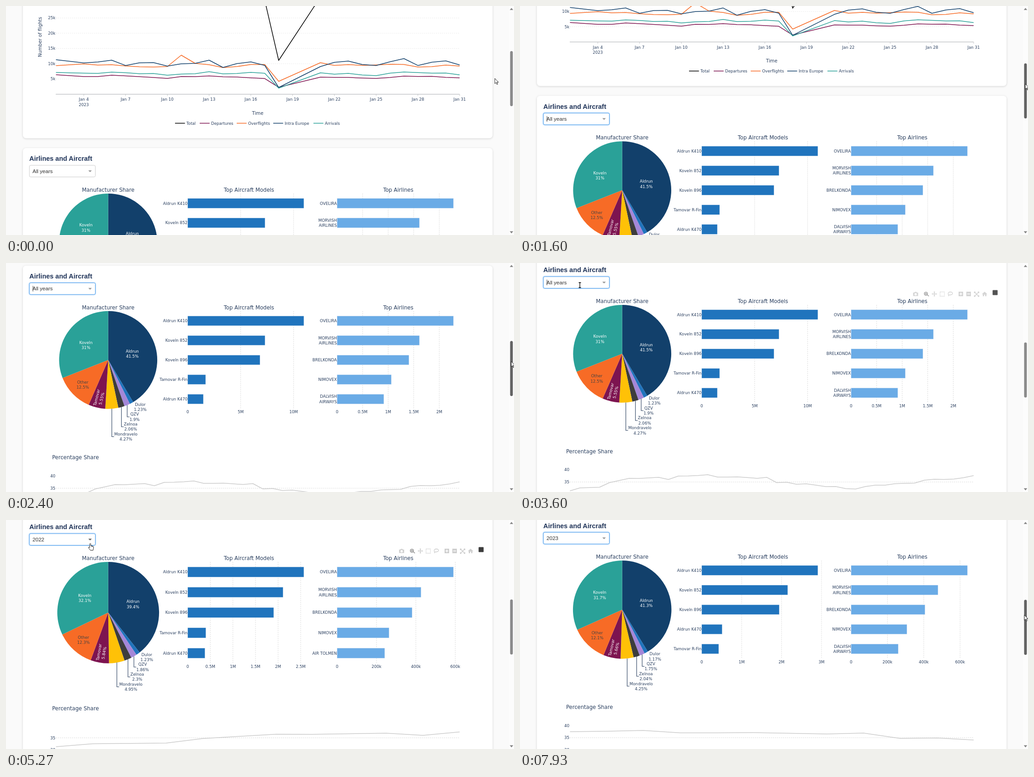
An HTML page for the animation above (8 s loop, 1112x503 px).

```html
<!DOCTYPE html>
<html lang="en">
<head>
<meta charset="utf-8">
<title>Flight dashboard</title>
<style>
html, body { margin: 0; width: 100%; height: 100%; overflow: hidden; background: #fafafa; }
svg { display: block; width: 1112px; height: 503px; isolation: isolate; }
text { font: 8.7px "DejaVu Sans", sans-serif; fill: #2a3f5f; white-space: pre; }
.title { font-size: 11.6px; }
.axis { font-size: 10.15px; }
.head { font: bold 14.48px "Liberation Sans", sans-serif; fill: #1f3358; }
.field { font: 11.58px "Liberation Sans", sans-serif; fill: #333; }
.light { fill: #fff; }
.dim { fill: #444; }
.card { fill: #fff; filter: drop-shadow(0 1px 2px rgba(0,0,0,.16)); }
.line { fill: none; stroke-width: 1.5; stroke-linejoin: round; }
.grid { fill: none; stroke: #ccc; stroke-width: .8; stroke-dasharray: 2.2 2.2; }
.lead { fill: none; stroke: #2a3f5f; stroke-width: 1.1; }
#cross { mix-blend-mode: difference; }
</style>
</head>
<body>
<svg id="stage" viewBox="0 0 1112 503" xmlns="http://www.w3.org/2000/svg"></svg>
<script>
const LEFT = 109.4, RIGHT = 993, NAVY = '#12406b';
const pen = document.createElement('canvas').getContext('2d');
pen.font = '8.7px "DejaVu Sans", sans-serif';
const widthOf = s => pen.measureText(s).width;

const text = (s, x, y, anchor = 'middle', cls = '', extra = '') =>
  `<text x="${x}" y="${y}" dy=".36em" text-anchor="${anchor}" class="${cls}" ${extra}>${s}</text>`;
const lines = (list, x, y, anchor, cls) =>
  list.map((s, i) => text(s, x, y + (i - (list.length - 1) / 2) * 11.3, anchor, cls)).join('');
const path = (d, attrs) => `<path d="${d}" ${attrs}/>`;
const rect = (x, y, w, h, attrs) => `<rect x="${x}" y="${y}" width="${w}" height="${h}" ${attrs}/>`;
const poly = (pts, color) =>
  `<polyline points="${pts.map(p => p.map(v => v.toFixed(1))).join(' ')}" class="line" stroke="${color}"/>`;

// Daily flights: pixel heights for days 2, 4-18 and 21-31
const days = [2];
for (let d = 4; d <= 31; d++) if (d < 19 || d > 20) days.push(d);
const dayX = d => LEFT + (d - 2) * 30.47;
const flights = [
  ['#7d1450', [151, 155, 155, 152, 153.5, 155.3, 157, 159, 155, 155.2, 153.5, 155.5, 156, 157.8, 159.3, 178.5,
    156.3, 156.8, 156.8, 158.2, 159, 157, 154, 154.8, 154.5, 156.7, 157.8]],
  ['#f76b26', [131, 127.3, 129.8, 129, 131.8, 133.5, 134, 133, 108, 126, 129, 135.3, 133, 128.5, 128.5, 165.5,
    124.5, 130.5, 128.7, 130.5, 129.5, 128, 128.5, 134, 133.3, 129.7, 132]],
  [NAVY, [118, 125, 123, 119, 130.7, 124.8, 124.3, 132, 127, 126, 119, 135, 126.5, 122.7, 130.5, 179,
    133, 123.7, 121, 128.5, 130.7, 122.5, 115.5, 130.7, 123.5, 120.5, 129.5]],
  ['#2aa198', [146, 147.5, 148, 145.3, 146.5, 148.7, 148.3, 152, 149.5, 148.7, 144.3, 149, 148.3, 145.8, 147.7, 180.5,
    146.8, 149.7, 148, 151.5, 153, 147.5, 145, 146.2, 147.5, 147.2, 151.3]]
];
const legend = [['Total', 370, '#000'], ['Departures', 424, '#7d1450'], ['Overflights', 505, '#f76b26'],
  ['Intra Europe', 585, NAVY], ['Arrivals', 673, '#2aa198']];

function flightChart() {
  let s = '';
  for (let k = 1; k <= 5; k++) {
    const y = 193.8 - k * 33.5;
    s += path(`M${LEFT} ${y}H${RIGHT}`, 'class="grid" style="stroke:#e4e4e4"') + text(k * 5 + 'k', 108, y, 'end');
  }
  s += path(`M${LEFT - .5} 193.8H${RIGHT}`, 'stroke="#c4c6c9" stroke-width="1.5"');
  for (let d = 4; d <= 31; d += 3) {
    s += path(`M${dayX(d)} 194v3.6`, 'stroke="#c4c6c9"') + text('Jan ' + d, dayX(d), 205.3);
  }
  s += text('2023', dayX(4), 216.8) + text('Time', 551, 235, 'middle', 'axis')
    + text('Number of flights', 0, 0, 'middle', 'axis', 'transform="translate(74.5 68) rotate(-90)"');
  s += poly([[dayX(17), -12.5], [dayX(18), 119.5], [dayX(21), -19.8]], '#000');
  for (const [color, ys] of flights) s += poly(ys.map((y, i) => [dayX(days[i]), y]), color);
  for (const [name, x, color] of legend)
    s += path(`M${x} 257.5h21.7`, `stroke="${color}" stroke-width="1.5"`) + text(name, x + 25, 257.5, 'start');
  return s;
}

// Pie slices run clockwise from the top
const makers = [['Aldrun', NAVY], ['Dulor', '#2074bd'], ['QZV', '#a487d8'], ['Zelnoa', '#3d3d3d'],
  ['Mondravelo', '#ffc107'], ['Tamovar', '#7d1450'], ['Other', '#f76b26'], ['Koveln', '#2aa198']];
const models = ['Aldrun K410', 'Koveln 852', 'Koveln 896', 'Tamovar R-Fin', 'Aldrun K470'];
const airlines = ['OVELIRA', 'MORVISH AIRLINES', 'BRELKONDA', 'NIMOVEX', 'DALVISH AIRWAYS'];
const views = [
  { mix: [41.5, 1.23, 1.9, 2.06, 4.27, 5.55, 12.5, 31], r: 107.4, labelY: 302.5,
    inside: { 0: [276.5, 185.6], 6: [168, 254], 7: [175, 166.8] },
    left: { names: models, ends: [652, 567, 556, 437, 432], step: 115.9, ticks: ['0', '5M', '10M'] },
    right: { names: airlines, ends: [979.5, 905, 882, 843.5, 827], step: 55.9, ticks: ['0', '0.5M', '1M', '1.5M', '2M'] } },
  { mix: [39.4, 1.23, 1.86, 2.3, 4.95, 5.84, 12.3, 32.1], r: 111.4, labelY: 301.2,
    inside: { 0: [278, 184.8], 6: [169.5, 263.5], 7: [172.5, 171.7] },
    left: { names: models, ends: [652, 606.5, 586, 437.5, 435.5], step: 49.45, ticks: ['0', '0.5M', '1M', '1.5M', '2M', '2.5M'] },
    right: { names: [...airlines.slice(0, 4), 'AIR TOLMEN'], ends: [979.5, 908.5, 889, 838.5, 829], step: 86.2, ticks: ['0', '200k', '400k', '600k'] } },
  { mix: [41.3, 1.17, 1.75, 2.04, 4.25, 5.66, 12.1, 31.7], r: 107.8, labelY: 302.6,
    inside: { 0: [276.5, 185.2], 6: [169, 256.2], 7: [174.5, 167.7] },
    left: { names: [0, 1, 2, 4, 3].map(i => models[i]), ends: [652, 586, 567.5, 442.5, 435], step: 87.4, ticks: ['0', '1M', '2M', '3M'] },
    right: { names: airlines, ends: [979.5, 915, 886.5, 847, 828], step: 79.5, ticks: ['0', '200k', '400k', '600k'] } }
];

function pie({ mix, r, labelY, inside }) {
  const cx = 223.7, cy = 91.9 + r, total = mix.reduce((a, b) => a + b);
  const point = (f, q = r) => [cx + q * Math.sin(f * 2 * Math.PI), cy - q * Math.cos(f * 2 * Math.PI)];
  let s = '', labels = '', from = 0;
  mix.forEach((share, i) => {
    const to = from + share / total, mid = (from + to) / 2;
    const [name, color] = makers[i], pair = [name, share + '%'];
    s += path(`M${cx} ${cy}L${point(from)}A${r} ${r} 0 0 1 ${point(to)}Z`, `fill="${color}"`);
    if (inside[i]) labels += lines(pair, ...inside[i], 'middle', i === 6 ? 'dim' : 'light');
    else if (i === 5) {
      const [x, y] = point(mid, r * .8);
      labels += `<g transform="translate(${x} ${y}) rotate(${mid * 360 - 270 + 0})">${lines(pair, 0, 0, 'middle', 'light')}</g>`;
    } else {
      const [x, y] = point(mid), ly = labelY + (i - 1) * 21.75;
      if (i > 1) labels += path(`M${x} ${y}V${ly}h5`, 'class="lead"');
      labels += lines(pair, x + 5.3 + Math.max(...pair.map(widthOf)) / 2, ly);
    }
    from = to;
  });
  return s + labels;
}

function bars({ names, ends, step, ticks }, x0, color, r) {
  const row = r * 2 / 5;
  let s = '';
  ticks.forEach((t, i) => {
    const x = x0 + i * step;
    if (i) s += path(`M${x} 92V${92 + 2 * r}`, 'class="grid"');
    s += text(t, x, 98.6 + 2 * r);
  });
  names.forEach((name, i) => {
    const y = 91.9 + row * (i + .5);
    const label = /AIR(LINES|WAYS)$/.test(name) ? name.split(' ') : [name];
    s += rect(x0, y - row / 4, ends[i] - x0, row / 2, `fill="${color}" stroke="#e5ecf6" stroke-width=".5"`)
      + lines(label, x0 - .6, y, 'end');
  });
  return s;
}

// Monthly share of the lower chart, 42 months
const share = [500.5, 494, 493.2, 492.5, 482.5, 477.8, 473, 473.3, 472, 470.8, 475.5, 468, 467.8, 466.8, 465, 470.2,
  470.2, 469.7, 471.2, 472.9, 470.8, 482.5, 481.5, 486, 485, 488, 491.3, 491, 495.5, 496.5, 491, 488, 488, 484.8,
  484, 483.5, 477, 475, 475.5, 474.5, 471.5, 467];

function shareChart(a, b, base, top) {
  const part = share.slice(a, b);
  return path(`M${LEFT} ${base}H${RIGHT}`, 'class="grid"')
    + (top ? text(top, 108, base - 26.7, 'end') : '')
    + text('35', 108, base, 'end') + text('30', 108, base + 26.7, 'end')
    + poly(part.map((y, i) => [LEFT + (RIGHT - LEFT) * i / (part.length - 1), y + base - 481]), '#ccc');
}

function modebar() {
  const icons = [
    [866, 'M-5.5-3H-3L-2-4.5H2L3-3H5.5V4.5H-5.5ZM0-2A2.6 2.6 0 1 0 .01-2Z'],
    [907, 'M0-6L2-3.5H.8V-.8H3.5V-2L6 0L3.5 2V.8H.8V3.5H2L0 6L-2 3.5H-.8V.8H-3.5V2L-6 0L-3.5-2V-.8H-.8V-3.5H-2Z'],
    [965, 'M-5-5H5V5H-5ZM-.8-3V-.8H-3V.8H-.8V3H.8V.8H3V-.8H.8V-3Z'],
    [982, 'M-5-5H5V5H-5ZM-3-.8V.8H3V-.8Z'],
    [1017, 'M0-5L6 .5H4V5H1.2V1.5H-1.2V5H-4V.5H-6Z']];
  const stroke = 'fill="none" stroke="#c6c6c6"';
  return icons.map(([x, d]) => path(d, `transform="translate(${x} 68)" fill="#c9c9c9" fill-rule="evenodd"`)).join('')
    + path('M892 70L895 73M888.5 64A3.5 3.5 0 1 0 888.6 64M886.8 67.5h3.6M888.6 65.7v3.6', 'fill="none" stroke="#858585" stroke-width="1.7"')
    + rect(919.5, 63.5, 9.5, 9.5, stroke + ' stroke-width="1.3" stroke-dasharray="1.8 1.2"')
    + path('M938 73Q939 71 937.5 69Q936 64 942 63.5Q948 64 946.5 68Q944 71 939 70', stroke + ' stroke-width="1.3"')
    + path('M995 64L1004 73M1004 64L995 73M994.5 66V63.5H997M1002 63.5H1004.5V66M1004.5 71V73.5H1002M997 73.5H994.5V71', stroke + ' stroke-width="1.5"')
    + rect(1034.5, 59.5, 11, 11, 'rx="1.2" fill="#222"');
}

const options = ['All years', '2022', '2023', '2024', '2025'];
const OPT = 25.3;
const stage = document.getElementById('stage');
stage.innerHTML = rect(0, 0, 1112, 503, 'fill="#fafafa"') + `
<g id="page">
  ${rect(37, -300, 1028, 590.5, 'rx="7" class="card"')}
  ${flightChart()}
  <g transform="translate(0 320)">
    ${rect(37, -8, 1028, 900, 'rx="7" class="card"')}
    ${text('Airlines and Aircraft', 51, 15.1, 'start', 'head')}
    ${text('Manufacturer Share', 223.7, 84, 'middle', 'title')}
    ${text('Top Aircraft Models', 531.8, 84, 'middle', 'title')}
    ${text('Top Airlines', 858.7, 84, 'middle', 'title')}
    ${text('Percentage Share', 101, 413.5, 'start', 'title')}
    ${views.map((v, i) => `<g id="top${i}">${bars(v.left, 397.8, '#2074bd', v.r)}${bars(v.right, 724.8, '#6aabe6', v.r)}${pie(v)}</g>`).join('')}
    <g id="low0">${shareChart(0, 42, 481, '40')}</g>
    <g id="low1">${shareChart(0, 12, 478.5, '')}</g>
    <g id="low2">${shareChart(12, 24, 481, '40')}</g>
    <g id="modebar">${modebar()}</g>
    ${rect(50, 28.8, 146.5, 27.8, 'id="glow" rx="4" fill="none" stroke="#d6eaff" stroke-width="2"')}
    ${rect(51.2, 29.9, 144.4, 25.6, 'id="box" rx="3" fill="#fff"')}
    ${text('', 58, 42.5, 'start', 'field', 'id="value"')}
    ${path('M59 36.5V49', 'id="caret" stroke="#333" stroke-width=".9"')}
    ${path('M180.2 41h7.6l-3.8 4Z', 'id="drop"')}
    <g id="menu">
      ${rect(51.2, 55.8, 144.4, OPT * 5, 'fill="#fff" stroke="#ccc" stroke-width=".8" style="filter:drop-shadow(0 .7px .5px rgba(0,0,0,.08))"')}
      ${rect(51.6, 56, 143.6, OPT, 'id="mark" fill="#ebf5ff"')}
      ${options.map((o, i) => text(o, 58, 56 + OPT * (i + .5), 'start', 'field')).join('')}
    </g>
  </g>
</g>
${rect(1101, 0, 11, 503, 'fill="#fcfcfc"')}
${path('M1102.7 8.8h7.6l-3.8-4.6ZM1102.7 494.8h7.6l-3.8 4.6Z', 'fill="#858585"')}
${rect(1103.5, 99, 6, 121, 'id="thumb" rx="3"')}
${path('M0 0V11.5L2.7 9L4.6 13.3L6.4 12.5L4.5 8.4H8Z', 'id="arrow" fill="#fff" stroke="#111" stroke-width=".9"')}
${path('M-1.2 1.2Q0-.6 1.2 1.2V5.4L6.3 6.6Q7.5 7.2 7.2 9L6.2 15.5H.2L-4 10Q-4.4 8.4-3 8.4L-1.2 9.8ZM3 8V6M5 8.3V6.5', 'id="hand" fill="#fff" stroke="#111" stroke-width=".9"')}
${path('M-2.5-5.5H2.5M0-5.5V5.5M-2.5 5.5H2.5', 'id="beam" fill="none" stroke="#000" stroke-width="1.3"')}
${path('M-8.5 0H8.5M0-8.5V8.5', 'id="cross" fill="none" stroke="#fff" stroke-width="1.2"')}`;

const $ = id => document.getElementById(id);
const set = (id, attrs) => { for (const k in attrs) $(id).setAttribute(k, attrs[k]); };
const show = (id, on) => $(id).style.display = on ? '' : 'none';

// Linear track through [time, ...values]
function track(keys, t) {
  let i = 0;
  while (i < keys.length - 2 && t >= keys[i + 1][0]) i++;
  const [a, b] = [keys[i], keys[i + 1]];
  const f = Math.min(1, Math.max(0, (t - a[0]) / (b[0] - a[0])));
  return a.slice(1).map((v, k) => v + (b[k + 1] - v) * f);
}

const scrollKeys = [[1133, 0], [1600, 114.7], [2000, 245.5], [2060, 245.5], [2300, 296], [2533, 320], [7867, 320], [7930, 322.8]];
const barKeys = [[2800, 0], [3000, 1], [3560, 1], [3740, 0], [4330, 0], [4530, 1], [5240, 1], [5460, 0],
  [6330, 0], [6530, 1], [7330, 1], [7600, 0]];
const mouseKeys = [[270, 1070, 159], [930, 1106, 144], [2670, 1106, 144], [3530, 131, 48.5], [3800, 131, 48.5],
  [4200, 110, 94], [4270, 110, 94], [4670, 330, 200], [5260, 184.5, 51], [5600, 184.5, 51], [6070, 110, 119],
  [6270, 110, 119], [6666, 419.5, 148.5], [7070, 885, 190], [7670, 1104, 208], [7930, 1104, 208.7]];

function cursorKind(x, y, open) {
  if (x > 50 && x < 196 && y > 29 && y < 57) return x < 172 ? 'beam' : 'hand';
  if (open) return 'hand';
  const plot = (x > 397 && x < 660) || (x > 724 && x < 994);
  return plot && y > 92 && y < 310 ? 'cross' : 'arrow';
}

function draw(t) {
  const [scroll] = track(scrollKeys, t);
  let [x, y] = track(mouseKeys, t);
  const slide = scroll * .236;
  if (t > 930 && t < 2600) y = 144 + slide;
  else if (t >= 2600 && t < 3530) y += 75.5 * (1 - Math.max(0, (t - 2670) / 860));
  const open = (t >= 3650 && t < 4320) || (t >= 5590 && t < 6320);
  const pick = t < 4320 ? 0 : t < 6320 ? 1 : 2;
  const top = t < 4720 ? 0 : t < 6460 ? 1 : 2;
  const low = t < 4460 ? 0 : t < 6460 ? 1 : 2;
  const focus = t >= 1190, kind = cursorKind(x, y, open);

  set('page', { transform: `translate(0 ${-scroll})` });
  set('thumb', { y: 99 + slide, fill: x > 1100 ? '#636363' : '#8b8b8b' });
  for (let i = 0; i < 3; i++) {
    show('top' + i, i === top);
    show('low' + i, i === low);
  }
  set('modebar', { opacity: track(barKeys, t)[0] });
  show('glow', focus);
  set('box', { stroke: focus ? '#3b93e6' : '#ccc' });
  $('value').textContent = options[pick];
  show('caret', focus && t < 3650 && !(t > 2790 && t < 3300));
  set('drop', { fill: kind === 'hand' && y < 57 || open ? '#666' : '#999' });
  show('menu', open);
  const over = y > 57 ? Math.floor((y - 56) / OPT) : pick;
  set('mark', { y: 56 + OPT * over });
  for (const id of ['arrow', 'hand', 'beam', 'cross']) {
    show(id, id === kind);
    set(id, { transform: `translate(${x} ${y})` });
  }
}

const start = performance.now(), TICK = 1000 / 15;
function loop() {
  const t = (performance.now() - start) % 8000;
  draw(Math.floor((t + 4) / TICK) * TICK);
  requestAnimationFrame(loop);
}
loop();
</script>
</body>
</html>
```
